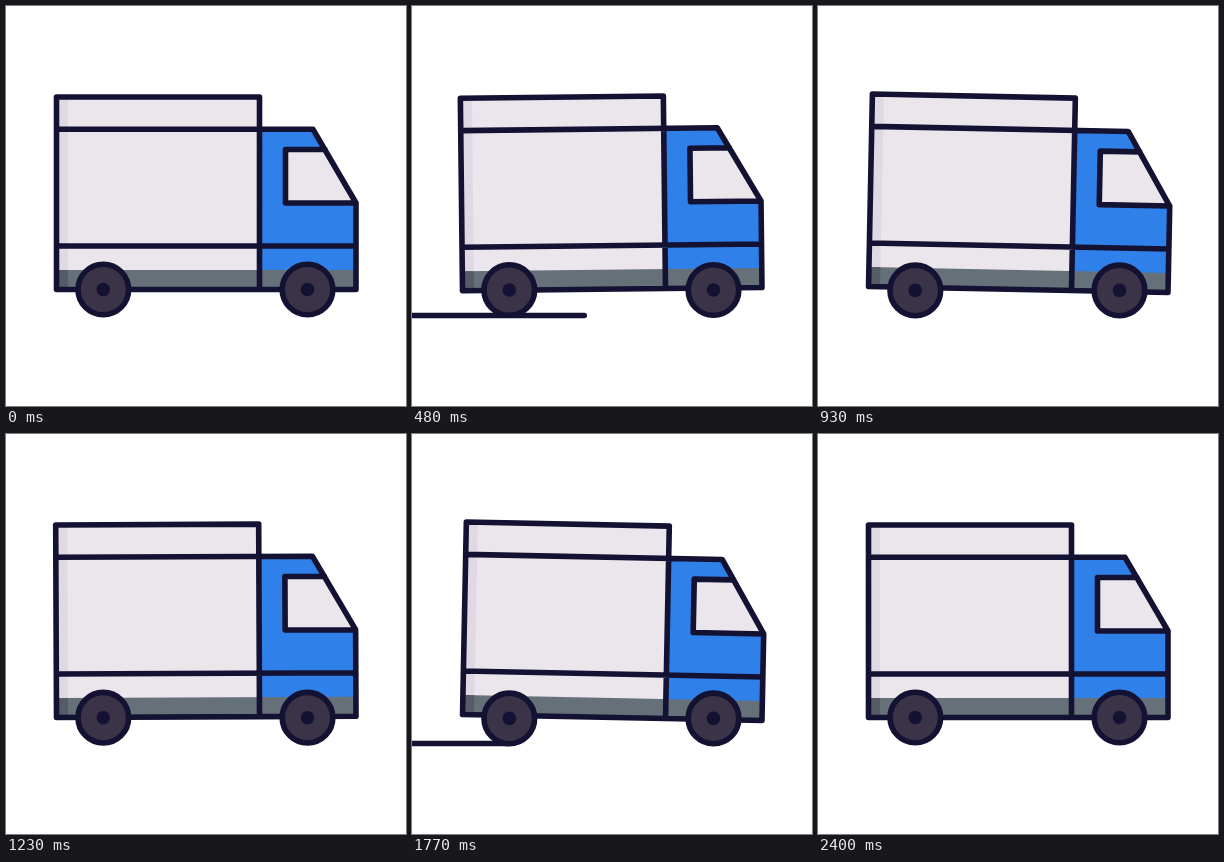
An HTML page that plays this animation: 400x400 px, repeating every 2490 ms.

```html
<!DOCTYPE html>
<html lang="en">
<head>
<meta charset="utf-8">
<title>Delivery truck</title>
<style>
  html, body { margin: 0; width: 100%; height: 100%; overflow: hidden; background: #fff; }
  svg { display: block; width: 100vw; height: 100vh; }
  .ink { fill: none; stroke: #141233; stroke-width: 5.6; stroke-linecap: round; stroke-linejoin: round; }
</style>
</head>
<body>
<svg viewBox="0 0 400 400">
  <defs>
    <g id="wheel">
      <circle r="25.3" fill="#3b3347" stroke="#141233" stroke-width="5.6"/>
      <circle r="6.8" fill="#141233"/>
    </g>
  </defs>
  <path id="road" class="ink" d="M129 309.5H351"/>
  <g id="body">
    <path fill="#ebe5ec" d="M50.5 91H253.5V283.5H50.5Z"/>
    <path fill="#e0d8e3" d="M50.5 91H62V283.5H50.5Z"/>
    <path fill="#2f80e8" d="M253.5 123H307L350 197V283.5H253.5Z"/>
    <path fill="#667079" d="M50.5 264H350V283.5H50.5Z"/>
    <path fill="#555b67" d="M50.5 264H62V283.5H50.5Z"/>
    <path fill="#ebe5ec" d="M279.5 143.5H319L350 197H279.5Z"/>
    <path class="ink" d="M50.5 91H253.5V283.5H50.5ZM50.5 123.3H307L350 197V283.5H253.5M50.5 240H350M319 143.5H279.5V197H350"/>
  </g>
  <g id="wheels">
    <use href="#wheel" x="97.3" y="283.5"/>
    <use href="#wheel" x="301.5" y="283.5"/>
  </g>
</svg>
<script>
  const LOOP = 2490, END = 2400, STEP = 30, PASS = 1200, TILT = 1.15;
  const [road, body, wheels] = ['road', 'body', 'wheels'].map(id => document.getElementById(id));

  // [time, tilt] extremes of the rocking
  const rock = [[0, 0], [150, 1], [630, -1], [935, 1], [1455, -1], [1790, 1], [2270, -1], [END, 0]];

  function tiltAt(t) {
    let i = 1;
    while (i < rock.length - 1 && t > rock[i][0]) i++;
    const [t0, a] = rock[i - 1], [t1, b] = rock[i];
    const p = (t - t0) / (t1 - t0);
    return a + (b - a) * (1 - Math.cos(Math.PI * p)) / 2;
  }

  // Offset of the road dash, slowing as it leaves
  function roadAt(t) {
    const u = t % PASS - 300;
    return -1.0889 * u + 0.000532 * u * u;
  }

  function draw(now) {
    const t = Math.min(END, Math.floor(now % LOOP / STEP) * STEP);
    const r = tiltAt(t), sway = Math.abs(r);
    const rest = Math.min(1, t / 150, (END - t) / 130);
    const lift = -0.85 * (1 - sway) * rest;
    road.setAttribute('transform', `translate(${roadAt(t)} 0)`);
    body.setAttribute('transform', `translate(0 ${lift}) rotate(${r * TILT} 200 284)`);
    wheels.setAttribute('transform', `translate(0 ${0.9 * sway})`);
  }

  const start = performance.now();
  function tick() {
    draw(performance.now() - start);
    requestAnimationFrame(tick);
  }
  tick();
</script>
</body>
</html>
```
